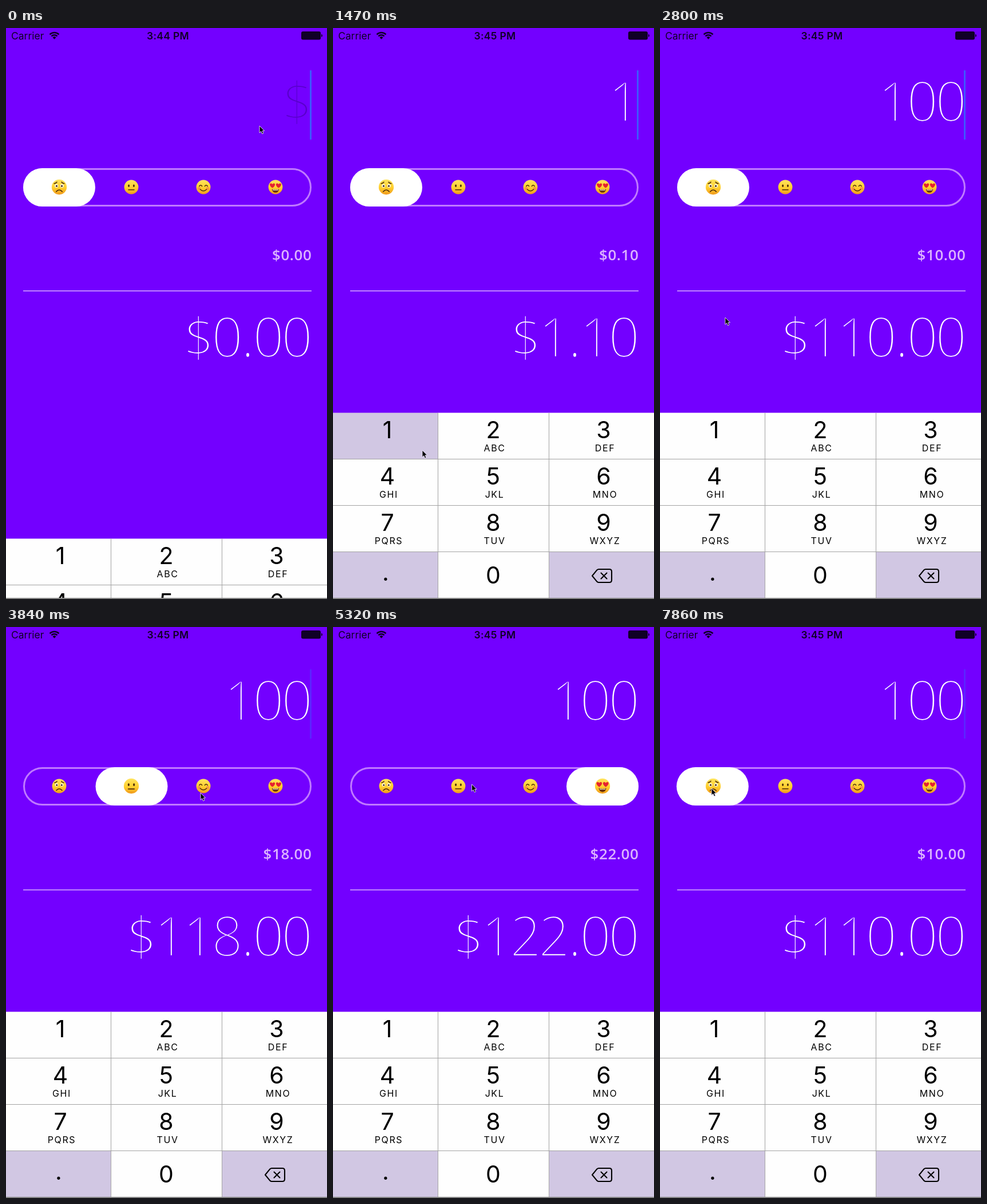
An HTML page that plays this animation: 561 px wide and 998 px high, repeating every 8 s.

```html
<!DOCTYPE html>
<html lang="en">
<head>
<meta charset="utf-8">
<title>Tip calculator</title>
<style>
  html, body { margin: 0; width: 100%; height: 100%; overflow: hidden; background: #7300ff; }
  svg { display: block; width: 100vw; height: 100vh; }
  .status { font: 400 17.5px Inter, sans-serif; fill: #100026; }
  .clock { font-weight: 600; letter-spacing: .3px; }
  /* The background-coloured outline slims the light digits to hairlines. */
  .big { font: 300 95px "Open Sans", "Noto Sans", sans-serif; text-anchor: middle;
         fill: #fff; stroke: #7300ff; stroke-width: 2.6px; }
  .tip { font: 600 26px "Open Sans", "Noto Sans", sans-serif; letter-spacing: .6px;
         text-anchor: end; fill: #dcb3ff; }
  .digit { font: 400 41px Inter, sans-serif; text-anchor: middle; }
  .letters { font: 400 16px Inter, sans-serif; letter-spacing: 1.6px; text-anchor: middle; }
  .line { fill: none; stroke: #4d2c08; stroke-width: 1.5; stroke-linecap: round; }
</style>
</head>
<body>
<svg viewBox="0 0 561 998" preserveAspectRatio="none">
  <defs>
    <linearGradient id="skin" x2="0" y2="1">
      <stop offset="0" stop-color="#ffe45e"/>
      <stop offset=".55" stop-color="#ffcf2e"/>
      <stop offset="1" stop-color="#f09a1c"/>
    </linearGradient>
    <circle id="head" r="12.4" fill="url(#skin)"/>
    <path id="heart" d="M0 4.6C-6 .5-5.2-3.6-2.6-3.6-1-3.6 0-2.2 0-1.6 0-2.2 1-3.6 2.6-3.6 5.2-3.6 6 .5 0 4.6Z" fill="#e5222f"/>
  </defs>
  <rect width="561" height="998" fill="#7300ff"/>

  <g class="status">
    <text x="9" y="19.5">Carrier</text>
    <text id="clock" class="clock" x="283" y="19.5" text-anchor="middle"></text>
    <g fill="none" stroke="#100026" stroke-width="2.5">
      <path d="M76.5 11.3a11.5 11.5 0 0 1 16 0M79.4 14.4a7.4 7.4 0 0 1 10.2 0"/>
    </g>
    <path d="M84.5 19.7l-3-3.2a4.3 4.3 0 0 1 6 0z"/>
    <rect x="516" y="6" width="34" height="14.5" rx="3"/>
    <path d="M551 10.5q2 .5 2 2.8t-2 2.8z"/>
  </g>

  <text id="amount" class="big" y="163"></text>
  <rect id="caret" x="531" y="74" width="3" height="121" fill="#3f57ff"/>

  <rect x="31.5" y="246.5" width="501" height="64" rx="32" fill="none" stroke="#c07aff" stroke-width="3"/>
  <rect id="knob" y="245" width="126" height="67" rx="33.5" fill="#fff"/>
  <g id="faces">
    <g>
      <use href="#head"/>
      <g fill="#fff"><circle cx="-4.6" cy="-2" r="2.7"/><circle cx="4.6" cy="-2" r="2.7"/></g>
      <g fill="#4d2c08"><circle cx="-4.3" cy="-1.7" r="1.5"/><circle cx="4.3" cy="-1.7" r="1.5"/></g>
      <path class="line" d="M-8.2-5.8q2.8-.4 4.4-2.4M8.2-5.8q-2.8-.4-4.4-2.4M-5 7.5q5-5.6 10 0"/>
    </g>
    <g>
      <use href="#head"/>
      <g fill="#4d2c08"><ellipse cx="-4.4" cy="-2.2" rx="1.5" ry="2.2"/><ellipse cx="4.4" cy="-2.2" rx="1.5" ry="2.2"/></g>
      <path class="line" d="M-5 4.8H5"/>
    </g>
    <g>
      <use href="#head"/>
      <g fill="#f58a4a" opacity=".75"><circle cx="-7.6" cy="2.4" r="2.8"/><circle cx="7.6" cy="2.4" r="2.8"/></g>
      <path class="line" d="M-7.2-1.5q2.4-3.6 4.8 0M2.4-1.5q2.4-3.6 4.8 0M-5.6 4q5.6 5.6 11.2 0"/>
    </g>
    <g>
      <use href="#head"/>
      <use href="#heart" x="-5.4" y="-3"/>
      <use href="#heart" x="5.4" y="-3"/>
      <path d="M-6.2 3.4q6.2 2 12.4 0-1 6.4-6.2 6.4t-6.2-6.4z" fill="#6b3208"/>
      <path d="M-5 4.2q5 1.3 10 0l-.6 1.5h-8.8z" fill="#fff"/>
    </g>
  </g>

  <text id="tip" class="tip" x="534.5" y="406"></text>
  <path d="M30 459.5H534" stroke="#d9b0ff" stroke-width="1.6"/>
  <text id="total" class="big" y="575"></text>

  <g id="keypad"></g>
  <rect y="996" width="561" height="2" fill="#858585"/>
  <path id="pointer" d="M0 0V12.2L2.8 9.6 4.7 14 6.9 13 5 8.8H8.6Z" fill="#000" stroke="#e9e0f5" stroke-width=".9"/>
</svg>

<script>
const LOOP = 8000, STEP = LOOP / 54;
const SLOT = 126, RATES = [.10, .18, .20, .22];
const $ = id => document.getElementById(id);

// Moments at which a segment is tapped.
const taps = [[3382, 1], [3880, 2], [4425, 3], [5668, 1], [6401, 3], [7586, 0]];
// Moments at which the amount changes, and how long each key stays lit.
const typing = [[0, ''], [1400, '1'], [1900, '10'], [2200, '100']];
const presses = [[1400, 1650, '1'], [1900, 2070, '0'], [2200, 2390, '0']];
// Pointer stops: time, x, y.
const route = [
  [0, 443, 171], [250, 443, 171], [1300, 156, 738], [1600, 156, 738],
  [1860, 248, 967], [2480, 248, 967], [2790, 42, 259], [2960, 42, 259],
  [3330, 215, 286], [3500, 215, 286], [3800, 340, 290], [3980, 340, 290],
  [4360, 466, 287], [4800, 466, 287], [5300, 208, 273], [5750, 210, 276],
  [6350, 467, 284], [6850, 467, 284], [7500, 90, 282], [LOOP, 90, 282]
];

const clamp = v => Math.min(1, Math.max(0, v));
const latest = (list, t, first) => list.reduce((v, [at, next]) => t >= at ? next : v, first);

function buildKeypad() {
  const labels = ['1', '2 ABC', '3 DEF', '4 GHI', '5 JKL', '6 MNO', '7 PQRS', '8 TUV', '9 WXYZ', '.', '0', ''];
  const left = [0, 184, 378, 561], middle = [95, 280, 473];
  let markup = '';
  labels.forEach((label, i) => {
    const col = i % 3, row = i / 3 | 0, y = row * 81;
    const [digit, letters] = label.split(' ');
    const fill = row === 3 && col !== 1 ? '#d1c7e3' : '#fefefe';
    const x = digit === '.' ? 92 : middle[col];
    const baseline = row < 3 ? y + 44.5 : digit === '.' ? 293.5 : 298.5;
    markup += `<rect data-key="${digit}" x="${left[col]}" y="${y}" width="${left[col + 1] - left[col]}" height="81" fill="${fill}"/>
      <text class="digit" x="${x}" y="${baseline}">${digit}</text>`;
    if (letters) markup += `<text class="letters" x="${x + 2.5}" y="${y + 67}">${letters}</text>`;
  });
  markup += `<path d="M183.5 0V325M377.5 0V325M0 81H561M0 162H561M0 243H561" stroke="#a3a3a3"/>
    <path d="M453 285l8.5-10.3q1.2-1.2 3-1.2H483q4 0 4 4v15q0 4-4 4h-18.500q-1.800 0-3-1.200zM468.500 280l10 10m0-10l-10 10"
      fill="none" stroke="#000" stroke-width="2.1" stroke-linejoin="round" stroke-linecap="round"/>`;
  $('keypad').innerHTML = markup;
}

// Under-damped step response, damping ratio one half.
function spring(ms) {
  if (ms <= 0) return 0;
  const a = ms / 1000 * 19.5, k = 1 / Math.sqrt(3);
  return 1 - Math.exp(-k * a) * (Math.cos(a) + k * Math.sin(a));
}

function knobX(t) {
  let x = 30, slot = 0;
  for (const [at, next] of taps) {
    x += (next - slot) * SLOT * spring(t - at);
    slot = next;
  }
  return x;
}

function pointerAt(t) {
  const i = route.findIndex(stop => stop[0] > t);
  const [t0, x0, y0] = route[i - 1], [t1, x1, y1] = route[i];
  const p = (t - t0) / (t1 - t0), e = p * p * (3 - 2 * p);
  return [x0 + (x1 - x0) * e, y0 + (y1 - y0) * e];
}

function caretOpacity(t) {
  if (t < 2400) return 1;
  const phase = t % 1000;
  return phase < 600 ? clamp((phase - 240) / 120) : clamp((875 - phase) / 55);
}

// Right-aligned figures on a fixed pitch.
function setFigures(node, text) {
  if (node.textContent === text) return;
  let edge = 533.5;
  const xs = [...text].reverse().map(c => {
    const width = c === '.' ? 22 : 50;
    edge -= width;
    return edge + width / 2;
  });
  node.setAttribute('x', xs.reverse().join(' '));
  node.textContent = text;
}

const dollars = v => '$' + v.toFixed(2);

buildKeypad();
const faces = [...$('faces').children];
const keys = ['1', '0'].map(k => document.querySelector(`[data-key="${k}"]`));

function draw(t) {
  const typed = latest(typing, t, '');
  const slot = latest(taps, t, 0);
  const tip = typed * RATES[slot];

  $('clock').textContent = t < 590 ? '3:44 PM' : '3:45 PM';
  setFigures($('amount'), typed || '$');
  $('amount').style.fill = typed ? '#fff' : '#5900cc';
  $('tip').textContent = dollars(tip);
  setFigures($('total'), dollars(+typed + tip));
  $('caret').setAttribute('opacity', caretOpacity(t));

  $('knob').setAttribute('x', knobX(t));
  faces.forEach((face, i) => face.setAttribute('transform',
    `translate(${93 + i * SLOT} 278) scale(${i === slot ? 1.06 : 1})`));

  const rise = 1.16 + t * .017;
  const top = 672.5 + 325 * (1 + rise) * Math.exp(-rise);
  $('keypad').setAttribute('transform', `translate(0 ${Math.round(top * 2) / 2})`);
  keys.forEach(key => {
    const lit = presses.some(([from, to, k]) => k === key.dataset.key && t >= from && t < to);
    key.setAttribute('fill', lit ? '#d1c7e3' : '#fefefe');
  });

  $('pointer').setAttribute('transform', `translate(${pointerAt(t).join(' ')})`);
}

const start = performance.now();
function tick() {
  const t = (performance.now() - start) % LOOP;
  draw(Math.min(53, Math.floor((t + 12) / STEP)) * STEP);
  requestAnimationFrame(tick);
}
tick();
</script>
</body>
</html>
```
